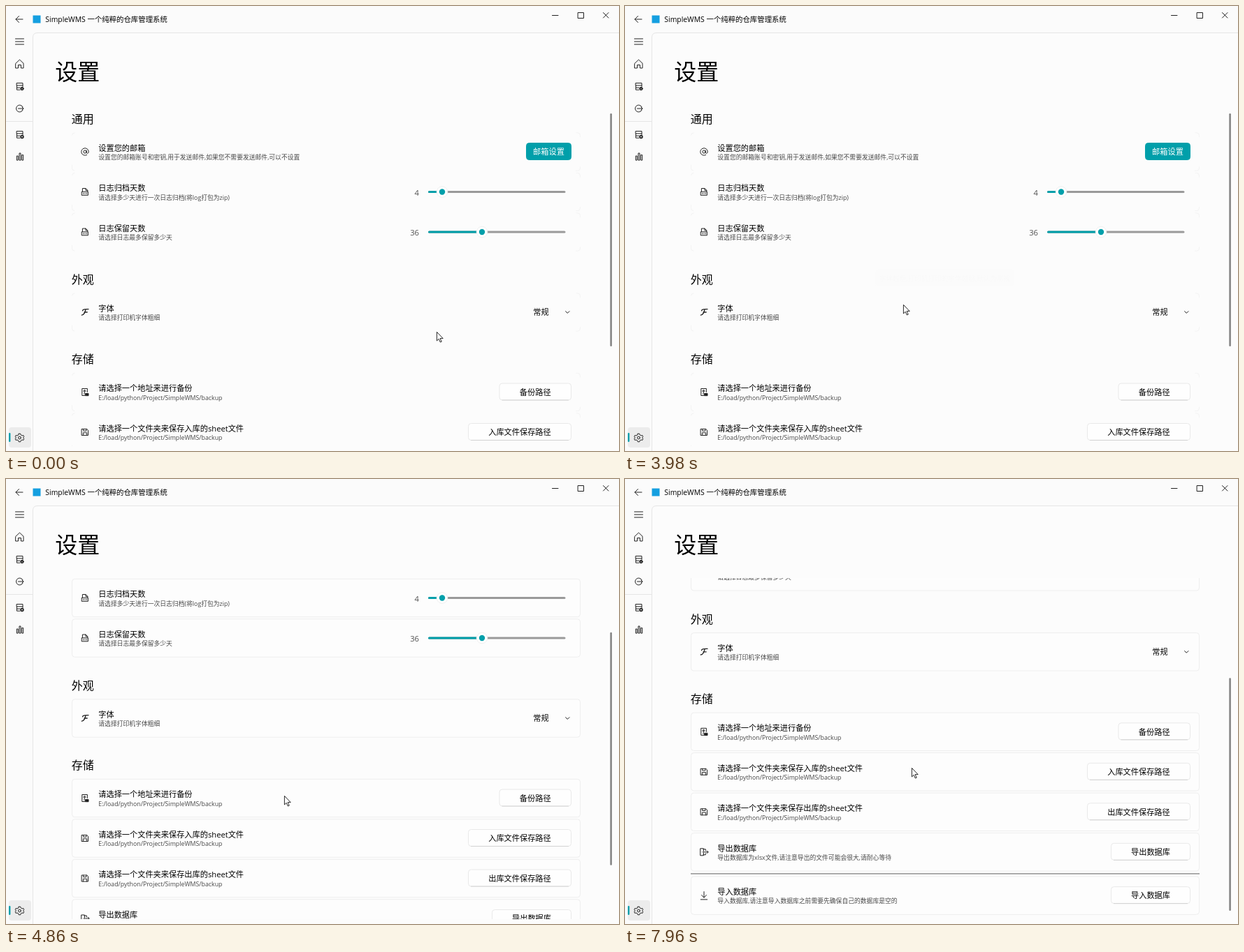
An HTML page that plays this animation: 877 by 638 pixels, repeating every 8000 ms.

```html
<!DOCTYPE html>
<html lang="zh-CN">
<head>
<meta charset="utf-8">
<title>设置</title>
<style>
  html, body { margin: 0; width: 100%; height: 100%; overflow: hidden; background: #fbfbfb; }
  svg { display: block; }
  text { font-family: "Open Sans", "Noto Sans CJK SC", "Noto Sans CJK", sans-serif; white-space: pre; }
  .card { fill: #fdfdfd; stroke: #eee; }
  .flat .card { fill: none; stroke: #f3f3f3; stroke-dasharray: 0 717 10.3 42.4 10.3 717 10.3 42.4 10.3; }
  .icon { fill: none; stroke: #222; stroke-width: 1; stroke-linecap: round; stroke-linejoin: round; }
  .solid { fill: #222; }
  .line { stroke: #e6e6e6; fill: none; }
  .panel { stroke: #e6e6e6; fill: #fcfcfc; }
  .tip { filter: drop-shadow(0 3px 3px #0003); }
</style>
</head>
<body>
<svg id="stage" width="877" height="638" viewBox="0 0 877 638"></svg>
<script>
const ACCENT = '#009faa', LOOP = 8000;

const ICONS = {
  back: '<path d="M5 0H-5M-.5-4.5L-5 0L-.5 4.5"/>',
  menu: '<path d="M-6-4H6M-6 0H6M-6 4H6"/>',
  home: '<path d="M-5.5-.8L0-6L5.5-.8V6H2V1.5H-2V6H-5.5Z"/>',
  stack: '<path d="M-4.5-5H4V-1.7H-4.5ZM-4.5-1.7V1.6H0M4-1.7V0M-4.5 1.6V4.7H0"/>',
  info: '<circle class="solid" cx="3" cy="3" r="2.2"/><path stroke="#fff" stroke-width=".7" d="M3 2.6V4"/>',
  cog: '<circle cx="3" cy="3" r="1.8" stroke-width="1.8"/>',
  out: '<path d="M4.6-2.2A5 5 0 1 0 4.6 2.2M-2 0H5.5M3.5-2L5.5 0L3.5 2"/>',
  chart: '<path d="M-4.7 4.7V-1H-2.7V4.7ZM-1 4.7V-5H1V4.7ZM2.7 4.7V-2.5H4.7V4.7Z"/>',
  gear: '<circle r="1.9"/><path d="M-1.2-5.8H1.2L1.8-4L3.6-3L5.4-3.5L6.2-1.4L5-0L6.2 1.4L5.4 3.5L3.6 3L1.8 4L1.2 5.8H-1.2L-1.8 4L-3.6 3L-5.4 3.5L-6.2 1.4L-5 0L-6.2-1.4L-5.4-3.5L-3.6-3L-1.8-4Z"/>',
  mail: '<circle r="2.1"/><path d="M2.1-2V.8C2.1 3 5.2 2.8 5.2 0A5.2 5.2 0 1 0 2.6 4.5"/>',
  log: '<path d="M-3.6-.5V-5H1L3.8-2.2V-.5M1-5V-2.2H3.8M-4.4-.2H4.4V4.8H-4.4Z"/><path stroke-width=".9" d="M-2.4 1.6V3M0 1.6V3M2.4 1.6V3"/>',
  font: '<path stroke-width="1.3" d="M-3.5-2.2C-3-4.4-1-4.2 5-4.4M1.2-4.2C0 0-1 4-4.7 4.2M-1 0H3.2"/>',
  backup: '<path d="M0 5H-4.2V-5H3.4V0M-1.5 2.5H-.6M-2-.8A1.6 1.6 0 1 1 1-.8M-.6-2V1"/><path class="solid" d="M.8 2H5V5.2H.8Z"/>',
  save: '<path d="M-4.5-4.5H2.8L4.5-2.8V4.5H-4.5ZM-2.3-4.5V-1.8H2V-4.5M-2.6 4.5V.8H2.6V4.5"/>',
  export: '<path d="M-1-5H-5.3V5H-1ZM-1-4H2.3V-2M-1 4H2.3V2M.8 0H6M4.3-1.8L6 0L4.3 1.8M-2.5 0H-2.4"/>',
  import: '<path d="M0-5.5V3M-3.5-.5L0 3L3.5-.5M-4.7 5.8H4.7"/>',
  chevron: '<path d="M-2.7-1.3L0 1.4L2.7-1.3"/>'
};

const icon = (x, y, ...names) =>
  `<g class="icon" transform="translate(${x} ${y})">${names.map(n => ICONS[n]).join('')}</g>`;

// cy is the vertical centre of the glyphs
const text = (x, cy, size, str, fill = '#000', anchor = 'start') =>
  `<text x="${x}" y="${cy + size * .38}" font-size="${size}" fill="${fill}" text-anchor="${anchor}">${str}</text>`;

const box = (x, y, w, h, attrs, r = 4) =>
  `<rect x="${x}" y="${y}" width="${w}" height="${h}" rx="${r}" ${attrs}/>`;

const heading = (cy, str) => text(93.7, cy, 16, str);

const card = (cy, glyph, title, note, control) =>
  box(94.5, cy - 27.2, 727, 54.4, 'class="card"') + icon(113, cy, glyph) +
  text(132.3, cy - 5.5, 11.2, title) + text(132.3, cy + 8, 8.8, note, '#484848') + control(cy);

const button = (label, left, primary) => cy =>
  box(left + .5, cy - 12.5, 808 - left, 24, primary ? `fill="${ACCENT}" stroke="${ACCENT}"` : 'fill="#fefefe" stroke="#e9e9e9"') +
  (primary ? '' : `<path stroke="#d2d2d2" d="M${left + 4} ${cy + 11.5}H805"/>`) +
  text((left + 809) / 2, cy, 11.2, label, primary ? '#fff' : '#000', 'middle');

const slider = (value, knob) => cy =>
  text(591, cy + .8, 11.2, value, '#505050', 'end') +
  box(604, cy - 1.6, 196.5, 3.2, 'fill="#9a9a9a"', 1.6) +
  box(604, cy - 1.6, knob - 604, 3.2, `fill="${ACCENT}"`, 1.6) +
  `<circle cx="${knob}" cy="${cy}" r="7.8" fill="#fff" stroke="#f0f0f0"/><circle cx="${knob}" cy="${cy}" r="4.2" fill="${ACCENT}"/>`;

const combo = cy => text(754.3, cy, 11.2, '常规') + icon(803.3, cy, 'chevron');

const PATH = 'E:/load/python/Project/SimpleWMS/backup';

const page =
  heading(162, '通用') +
  card(209, 'mail', '设置您的邮箱', '设置您的邮箱账号和密钥,用于发送邮件,如果您不需要发送邮件,可以不设置', button('邮箱设置', 744, true)) +
  card(266.5, 'log', '日志归档天数', '请选择多少天进行一次日志归档(将log打包为zip)', slider(4, 624)) +
  card(324, 'log', '日志保留天数', '请选择日志最多保留多少天', slider(36, 681)) +
  heading(391.7, '外观') +
  card(439, 'font', '字体', '请选择打印机字体粗细', combo) +
  heading(506.3, '存储') +
  card(553.5, 'backup', '请选择一个地址来进行备份', PATH, button('备份路径', 705.5)) +
  card(611, 'save', '请选择一个文件夹来保存入库的sheet文件', PATH, button('入库文件保存路径', 661)) +
  card(668.5, 'save', '请选择一个文件夹来保存出库的sheet文件', PATH, button('出库文件保存路径', 661)) +
  card(726, 'export', '导出数据库', '导出数据库为xlsx文件,请注意导出的文件可能会很大,请耐心等待', button('导出数据库', 695)) +
  box(94, 756.2, 728, 1.8, 'fill="#a3a3a3"', 0) +
  card(788.3, 'import', '导入数据库', '导入数据库,请注意导入数据库之前需要先确保自己的数据库是空的', button('导入数据库', 695));

const chrome =
  '<path class="panel" d="M878 38.5H45Q38.5 38.5 38.5 45V639H878Z"/><path class="line" d="M0 165.5H38"/>' +
  icon(19, 19, 'back') + box(38.5, 13.5, 11, 11, 'fill="#159fe0"', 0) +
  text(56.3, 19.3, 10.4, 'SimpleWMS 一个纯粹的仓库管理系统') +
  '<path class="icon" d="M781.5 13.5H790M818.5 9.5H826.5V17.5H818.5ZM854.5 9.5L862 17M862 9.5L854.5 17"/>' +
  box(4, 604, 32, 29, 'fill="#ececec"') + box(4, 612, 2.4, 13, `fill="${ACCENT}"`, 1.2) +
  icon(19.5, 51, 'menu') + icon(19.5, 83, 'home') + icon(20, 115.5, 'stack', 'info') + icon(19.5, 147, 'out') +
  icon(20, 184.5, 'stack', 'cog') + icon(20, 216, 'chart') + icon(19.5, 619, 'gear') +
  text(70.3, 93.4, 32, '设置');

// [fade-in start, hide time, top, text width, text]
const TIPS = [
  [1200, 1990, 147.5, 246, '您需要设置您邮箱的账号和密钥(注意这里密钥不等于密码)'],
  [2330, 2900, 205, 322, '选择多少天进行一次日志归档,归档后的日志将会打包为压缩文件,默认为四天'],
  [3170, 3600, 262.5, 178, '日志最多保留天数,超过的日志,会自动删除'],
  [3980, 4490, 377.5, 187, '字体越粗,打印机打印的字体越粗,默认为常规'],
  [6640, 7160, 358.5, 331, '您需要选择一个文件夹来保存入库文件,每次入库完成后,将会自动生成入库表格']
];

const tipMarkup = ([, , top, width, str]) =>
  `<g opacity="0"><g class="tip">${box(457.5 - width / 2 - 6, top, width + 12, 24, 'fill="#f3f3f3" stroke="#e4e4e4"')}</g>` +
  `${text(457.5, top + 12.5, 9.6, str, '#000', 'middle')}</g>`;

// [time, x, y] of the pointer tip
const POINTER = [
  [10, 616, 467], [50, 640, 438], [115, 683, 390], [180, 759, 357],
  [645, 759, 357], [690, 735, 357], [780, 643, 349], [870, 527, 311], [920, 457, 271], [980, 428, 234], [1070, 417, 206],
  [1170, 417, 206], [1210, 417, 204],
  [1910, 417, 204], [2200, 417, 274],
  [2860, 417, 274], [3060, 413, 348],
  [3570, 413, 348], [3840, 398, 428],
  [4470, 398, 428], [4620, 398, 454],
  [6220, 398, 454], [6400, 408, 420],
  [7120, 408, 420], [7250, 419, 358],
  [7790, 419, 358], [7960, 410, 414]
];

const stage = document.getElementById('stage');
stage.innerHTML = chrome +
  '<clipPath id="view"><rect x="39" y="142" width="838" height="489"/></clipPath>' +
  `<g clip-path="url(#view)"><g id="page">${page}</g></g>` +
  box(864.3, 154, 2.6, 334, 'id="bar" fill="#858585"', 1.3) +
  `<g id="tips">${TIPS.map(tipMarkup).join('')}</g>` +
  '<path id="pointer" fill="#fff" stroke="#111" stroke-width=".9" d="M.4.4V13L3.2 10.3L5.3 15L7.2 14.2L5.1 9.6H9.2Z"/>';

const [pageEl, bar, tips, pointer] = ['page', 'bar', 'tips', 'pointer'].map(id => document.getElementById(id));
const clamp = v => Math.min(1, Math.max(0, v));
const easeOut = v => 1 - (1 - clamp(v)) ** 3;
const move = (el, x, y) => el.setAttribute('transform', `translate(${x} ${y})`);

function pointerAt(t) {
  const next = POINTER.findIndex(p => p[0] > t);
  if (next <= 0) return POINTER.at(next).slice(1);
  const [a, b] = [POINTER[next - 1], POINTER[next]];
  const k = (t - a[0]) / (b[0] - a[0]);
  return [a[1] + (b[1] - a[1]) * k, a[2] + (b[2] - a[2]) * k];
}

// The window is shown at 80 %, so whole scroll steps are 0.8 px
const scrollAt = t => .8 * Math.round(120 * easeOut((t - 4356) / 500) + 119 * easeOut((t - 5873) / 500));

function draw() {
  const t = performance.now() % LOOP;
  const scroll = scrollAt(t);
  move(pageEl, 0, -scroll);
  move(bar, 0, scroll * .686);
  move(pointer, ...pointerAt(t).map(Math.round));
  stage.classList.toggle('flat', t < 4480);
  TIPS.forEach(([start, end], i) =>
    tips.children[i].setAttribute('opacity', t < end ? clamp((t - start) / 150) : 0));
  requestAnimationFrame(draw);
}
draw();
</script>
</body>
</html>
```
